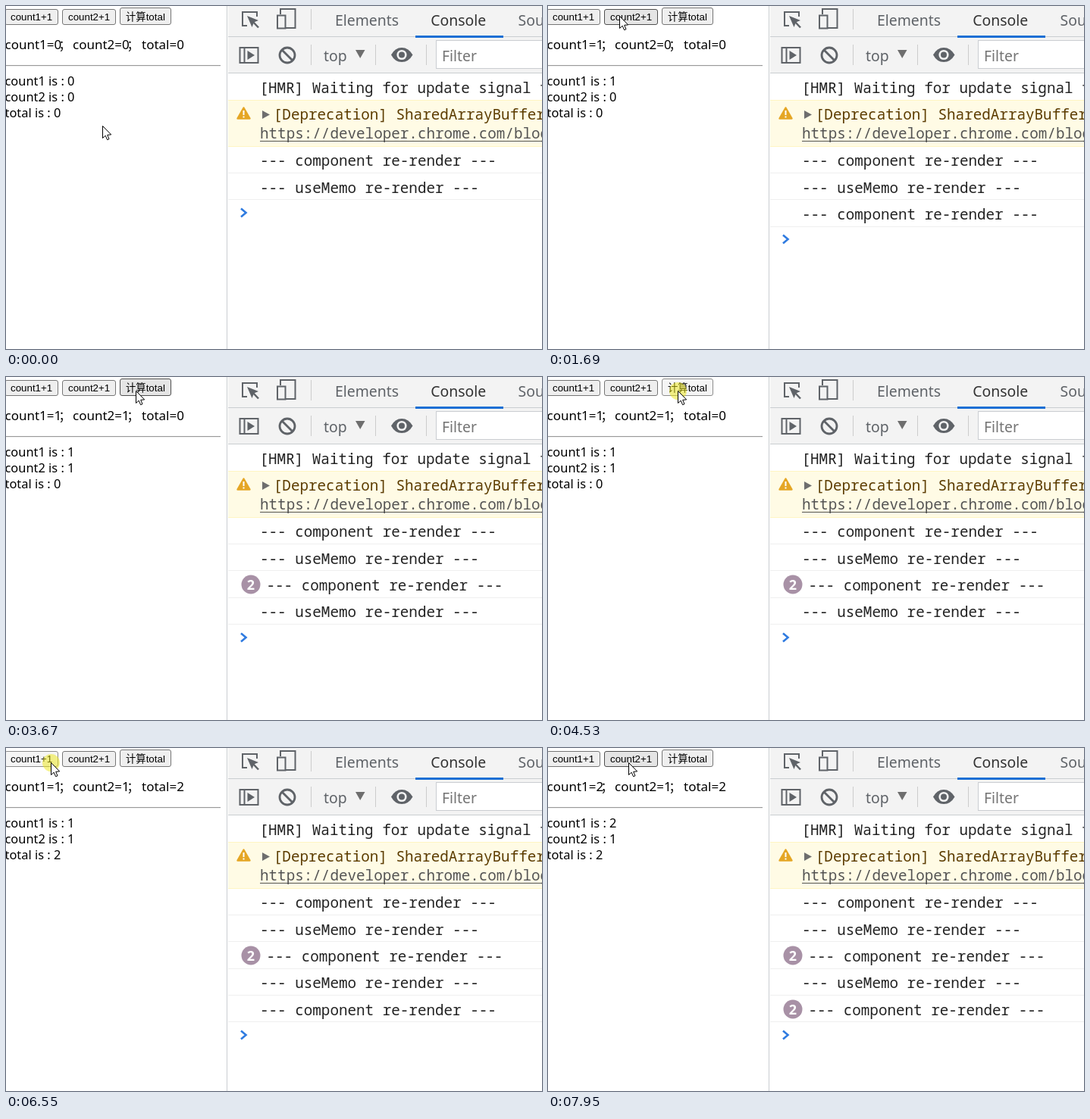
Recreate the animation shown at these times as an HTML page with a canvas. Size 707 by 453 pixels, loop 8 s.

```html
<!DOCTYPE html>
<html lang="zh-CN">
<head>
<meta charset="utf-8">
<title>useMemo console</title>
<style>
html, body { margin: 0; width: 100%; height: 100%; overflow: hidden; background: #fff; }
canvas { display: block; width: 707px; height: 453px; }
</style>
</head>
<body>
<canvas id="stage" width="707" height="453"></canvas>
<script>
const ctx = document.getElementById('stage').getContext('2d');
const LOOP = 8000;
const CJK = '"Noto Sans CJK SC", "Noto Sans CJK", sans-serif';
const PAGE = '16.4px "Noto Sans", sans-serif';
const SUMMARY = '17px "Noto Sans", sans-serif';
const WIDE = '16px ' + CJK;
const BUTTON = '13.333px "Liberation Sans", ' + CJK;
const TOOL = '19.4px "Noto Sans", sans-serif';
const MONO = '19.25px "Noto Sans Mono", monospace';
const GRAY = '#5f6368', RULE = '#cacdd1', INK = '#222';
const ROW = 35.3;

// Pointer moves: start, last step, number of steps, end point
const moves = [
  [70, 540, 8, 46, 10],
  [1350, 1820, 8, 99, 13],
  [2740, 3400, 9, 168, 20],
  [3670, 3670, 1, 171, 18],
  [5460, 5750, 5, 59, 19],
  [7280, 7550, 5, 112, 19],
  [7950, 7950, 1, 106, 19]
];

// Clicks: button down, page update, console update
const clicks = [
  { down: 800, page: 940, log: 1010 },
  { down: 2350, page: 2470, log: 2540 },
  { down: 4470, page: 4540, log: 4600 },
  { down: 6550, page: 6690, log: 6690 }
];

const buttons = [
  { x: -2, y: 4, w: 71, h: 20, label: 'count1+1', tx: 6 },
  { x: 74, y: 4, w: 71, h: 20, label: 'count2+1', tx: 82 },
  { x: 150, y: 2, w: 68, h: 22, label: '计算total', tx: 158 }
];

function text(str, x, y, font, color) {
  ctx.font = font;
  ctx.fillStyle = color;
  ctx.fillText(str, x, y);
}

function rect(x, y, w, h, color) {
  ctx.fillStyle = color;
  ctx.fillRect(x, y, w, h);
}

function trace(points, closed) {
  ctx.beginPath();
  points.forEach(([x, y], i) => i ? ctx.lineTo(x, y) : ctx.moveTo(x, y));
  if (closed) ctx.closePath();
}

function poly(points, color) {
  trace(points, true);
  ctx.fillStyle = color;
  ctx.fill();
}

function line(points, color, width) {
  trace(points, false);
  ctx.strokeStyle = color;
  ctx.lineWidth = width;
  ctx.stroke();
}

function circle(x, y, r, color) {
  ctx.beginPath();
  ctx.arc(x, y, r, 0, Math.PI * 2);
  ctx.fillStyle = color;
  ctx.fill();
}

function box(x, y, w, h, color, width) {
  ctx.strokeStyle = color;
  ctx.lineWidth = width;
  ctx.strokeRect(x, y, w, h);
}

function pointerAt(t) {
  let x = 127, y = 158;
  for (const [start, end, steps, toX, toY] of moves) {
    if (t < start) break;
    const gap = steps > 1 ? (end - start) / (steps - 1) : 1;
    const done = Math.min(steps, Math.floor((t - start) / gap) + 1);
    const p = 1 - Math.pow(1 - done / steps, 1.75);
    x += (toX - x) * p;
    y += (toY - y) * p;
  }
  return { x: Math.round(x), y: Math.round(y) };
}

function drawButton(b, pointer, pressed) {
  const hover = pointer.x >= b.x && pointer.x < b.x + b.w &&
                pointer.y >= b.y && pointer.y < b.y + b.h;
  const [fill, edge] = !hover ? ['#efefef', '#767676']
    : pressed ? ['#f5f5f5', '#8d8d8d'] : ['#e5e5e5', '#4f4f4f'];
  ctx.beginPath();
  ctx.roundRect(b.x + .5, b.y + .5, b.w - 1, b.h, 2.5);
  ctx.fillStyle = fill;
  ctx.fill();
  ctx.strokeStyle = edge;
  ctx.lineWidth = 1;
  ctx.stroke();
  text(b.label, b.tx, 19, BUTTON, '#000');
}

function drawPage(t, pointer, pressed) {
  const past = i => t >= clicks[i].page;
  const count1 = past(3) ? 2 : past(0) ? 1 : 0;
  const count2 = past(1) ? 1 : 0;
  const total = past(2) ? 2 : 0;

  buttons.forEach(b => drawButton(b, pointer, pressed));
  text('count1=' + count1, -1.5, 57, SUMMARY, '#000');
  text('；', 69.5, 57, WIDE, '#000');
  text('count2=' + count2, 88, 57, SUMMARY, '#000');
  text('；', 159.5, 57, WIDE, '#000');
  text('total=' + total, 179, 57, SUMMARY, '#000');
  rect(0, 78, 283, 1, '#9a9a9a');
  rect(0, 79, 283, 1, '#eee');
  text('count1 is : ' + count1, -1.5, 105, PAGE, '#000');
  text('count2 is : ' + count2, -1.5, 126, PAGE, '#000');
  text('total is : ' + total, -1.5, 147, PAGE, '#000');
}

function drawTabs() {
  rect(293, 0, 414, 88, '#f3f3f3');
  rect(293, 40, 414, 1, RULE);
  rect(293, 88, 414, 1, RULE);
  rect(540, 39, 116, 3, '#1a6fd4');

  // element picker
  line([[318, 26], [312, 26], [312, 8], [331, 8], [331, 14]], GRAY, 2);
  poly([[318, 13], [333, 19], [327, 21.5], [324.5, 28]], GRAY);
  line([[325, 20], [333, 28.5]], GRAY, 2.5);

  // device switch
  line([[362, 11], [362, 4], [381.5, 4], [381.5, 29], [369, 29]], GRAY, 2);
  box(358, 12.5, 10.5, 17, GRAY, 2);

  rect(402, 4, 1, 27, '#ccc');
  text('Elements', 434, 26, TOOL, GRAY);
  text('Console', 560.3, 26, TOOL, '#333');
  text('Sources', 675.5, 26, TOOL, GRAY);
}

function drawToolbar() {
  box(308.5, 55, 24, 20, GRAY, 2);
  line([[314.5, 55], [314.5, 75]], GRAY, 2);
  poly([[318.5, 59], [328, 65], [318.5, 71]], GRAY);

  ctx.beginPath();
  ctx.arc(371, 65, 10, 0, Math.PI * 2);
  ctx.strokeStyle = GRAY;
  ctx.lineWidth = 2.8;
  ctx.stroke();
  line([[364, 58], [378, 72]], GRAY, 2.8);

  for (const x of [402, 487, 554]) rect(x, 51, 1, 27, '#ccc');
  text('top', 419, 73, TOOL, GRAY);
  poly([[461, 58], [473.5, 58], [467.2, 69]], '#6e6e6e');

  ctx.beginPath();
  ctx.moveTo(508, 64.5);
  ctx.quadraticCurveTo(513, 55, 522, 55);
  ctx.quadraticCurveTo(531, 55, 536.5, 64.5);
  ctx.quadraticCurveTo(531, 74, 522, 74);
  ctx.quadraticCurveTo(513, 74, 508, 64.5);
  ctx.fillStyle = GRAY;
  ctx.fill();
  circle(522, 64.5, 6.6, '#f3f3f3');
  circle(522, 64.5, 4, GRAY);

  rect(567, 45, 140, 38, RULE);
  rect(568, 46, 139, 36, '#fff');
  text('Filter', 575, 73, TOOL, '#757575');
}

function drawWarning() {
  rect(293, 124, 414, 62, '#fff5c2');
  rect(293, 125, 414, 60, '#fffbe5');
  ctx.lineJoin = 'round';
  trace([[313.5, 134.5], [321.5, 148.5], [305.5, 148.5]], true);
  ctx.fillStyle = ctx.strokeStyle = '#e5a624';
  ctx.lineWidth = 2.4;
  ctx.fill();
  ctx.stroke();
  ctx.lineJoin = 'miter';
  rect(312.5, 138, 2, 6, '#fff');
  rect(312.5, 145.5, 2, 2, '#fff');
  poly([[338, 138], [348, 143.5], [338, 149]], '#6e6e6e');
  text('[Deprecation] SharedArrayBuffer will', 352.8, 150, MONO, '#5c3c00');
  text('https://developer.chrome.com/blog/', 335, 175, MONO, '#545454');
  rect(335, 178, 372, 1, '#545454');
}

function drawConsole(t) {
  const past = i => t >= clicks[i].log;
  const rows = [['component', 1], ['useMemo', 1]];
  if (past(0)) rows.push(['component', past(1) ? 2 : 1]);
  if (past(1)) rows.push(['useMemo', 1]);
  if (past(2)) rows.push(['component', past(3) ? 2 : 1]);

  text('[HMR] Waiting for update signal from', 334.5, 115, MONO, INK);
  drawWarning();

  rows.forEach(([name, times], i) => {
    const base = Math.round(211.4 + i * ROW);
    rect(293, Math.floor(220.4 + i * ROW), 414, 1, '#efefef');
    if (times > 1) {
      circle(323, base - 8, 12.5, '#a891a6');
      text(String(times), 317.7, base - 1, 'bold 18px "Noto Sans", sans-serif', '#fff');
    }
    text('--- ' + name + ' re-render ---', times > 1 ? 343.5 : 335, base, MONO, INK);
  });

  const y = Math.round(273 + (rows.length - 2) * ROW);
  line([[310, y - 5.5], [316.5, y], [310, y + 5.5]], '#2f7be0', 2.6);
}

function drawPointer({ x, y }) {
  const shape = [[0, 0], [0, 16], [3.7, 12.7], [6.1, 18.2], [8.5, 17.2], [6.2, 11.8], [11.2, 11.4]];
  trace(shape.map(([dx, dy]) => [x + .5 + dx, y + .5 + dy]), true);
  ctx.fillStyle = '#fff';
  ctx.strokeStyle = '#000';
  ctx.lineWidth = 1;
  ctx.fill();
  ctx.stroke();
}

function draw(t) {
  const pointer = pointerAt(t);
  const pressed = clicks.some(c => t >= c.down && t < c.page);
  rect(0, 0, 707, 453, '#fff');
  drawPage(t, pointer, pressed);
  rect(291, 0, 1, 453, RULE);
  drawTabs();
  drawToolbar();
  drawConsole(t);
  if (pressed) circle(pointer.x + .5, pointer.y + .5, 11.5, 'rgba(238, 232, 20, .5)');
  drawPointer(pointer);
}

const begin = performance.now();
function frame() {
  draw((performance.now() - begin) % LOOP);
  requestAnimationFrame(frame);
}
frame();
</script>
</body>
</html>
```
